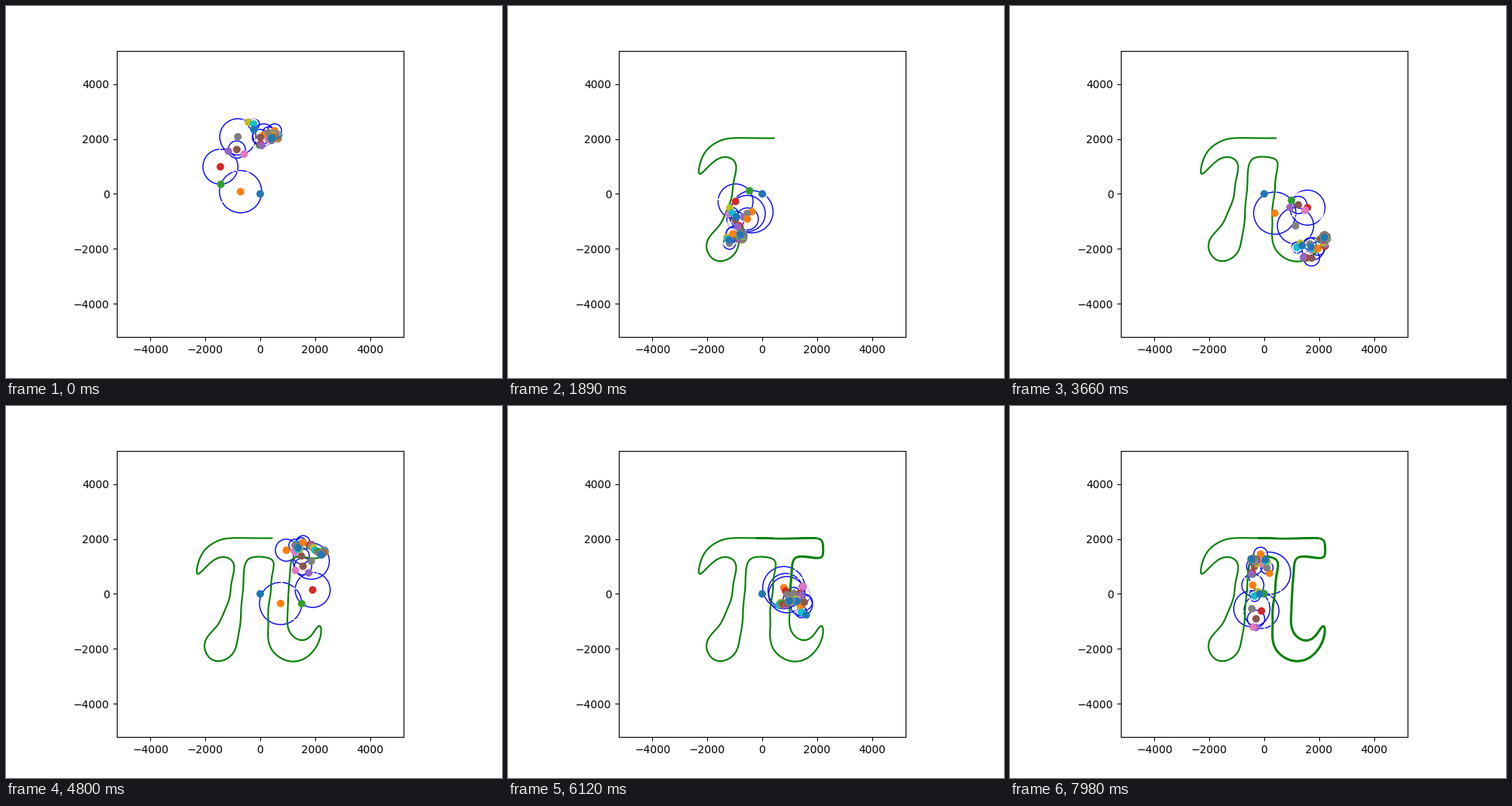
Write a matplotlib script that moves like this. It is 640 px wide and 480 px high and loops after 8 s.

```python
import matplotlib.pyplot as plt
import numpy as np
from matplotlib.animation import FuncAnimation
from matplotlib.collections import EllipseCollection

FRAMES = 267
LOOP_MS = 8000
PAIRS = 50            # harmonics +n and -n
START = 7             # phase of the first frame, one degree per frame
LIMIT = 5220
UNIT = 2 * LIMIT / 369.6   # data units per pixel
GAP = 25              # sideways shift of the return pass

# Strokes of the outline: phase at which each one ends, and its points in pixels.
STROKES = [
    (0, [(407, 170.6)]),
    (7, [(344, 170.5)]),
    (11.5, [(296, 170.3)]),
    (32, [(277, 172.8), (261, 180), (258, 186), (252, 192), (250, 202),
          (243, 215), (245, 218.7), (250, 218.5), (256, 209), (266, 200),
          (280, 195.6)]),
    (70, [(289, 195.6), (293.7, 199.5), (293, 215), (289, 243), (276, 278),
          (258, 302), (256, 310), (261, 324), (274, 329.3), (287, 325),
          (295, 315), (300.3, 295)]),
    (87, [(303, 270), (306.5, 225), (309, 201), (311, 196.5)]),
    (129, [(316, 195.5), (340, 195.5), (345.5, 199), (344.5, 210),
           (338, 283), (340, 308), (349, 322), (369, 329.4), (389, 324.5),
           (398, 314), (404.5, 299)]),
    (149, [(408, 288), (406, 282), (403, 281.8), (394, 298), (382, 301.8),
           (367, 294), (363, 277), (364, 252)]),
    (167, [(367.5, 204), (370, 195.6), (407, 195.7), (408.5, 192)]),
    (171.5, [(403, 180), (410.5, 171.8)]),
    (180, [(404, 170.5), (311, 170.5)]),
]


def slopes(v, knots):
    """Tangents that never overshoot: harmonic mean of the neighbours."""
    d = np.diff(v) / np.diff(knots)
    a, b = d[:-1], d[1:]
    mid = np.divide(2 * a * b, a + b, out=np.zeros_like(a), where=a * b > 0)
    return np.concatenate([d[:1], mid, d[-1:]])


def hermite(s, knots, p, m):
    """Smooth curve through p at knots with tangents m."""
    i = np.clip(np.searchsorted(knots, s, side="right") - 1, 0, len(p) - 2)
    h = knots[i + 1] - knots[i]
    u = (s - knots[i]) / h
    return ((1 + 2 * u) * (1 - u) ** 2 * p[i] + u * (1 - u) ** 2 * h * m[i]
            + u * u * (3 - 2 * u) * p[i + 1] + u * u * (u - 1) * h * m[i + 1])


def harmonics(samples=1440):
    """Fourier coefficients of the outline, traced there and back."""
    px = np.array([q for _, pts in STROKES for q in pts])
    p = ((px[:, 0] - 328) + 1j * (242.4 - px[:, 1])) * UNIT
    knots = np.concatenate([[0], np.cumsum(np.abs(np.diff(p)))])
    m = slopes(p.real, knots) + 1j * slopes(p.imag, knots)

    ends = np.cumsum([len(pts) for _, pts in STROKES]) - 1
    phase = np.arange(samples) * 360 / samples
    there = np.minimum(phase, 360 - phase)
    s = np.interp(there, [a for a, _ in STROKES], knots[ends])
    z = hermite(s, knots, p, m)

    ahead = hermite(np.minimum(s + 5, knots[-1]), knots, p, m)
    behind = hermite(np.maximum(s - 5, 0), knots, p, m)
    normal = 1j * (ahead - behind) / np.abs(ahead - behind)
    shift = GAP * np.clip(-8 * np.sin(np.radians(phase)), 0, 1)
    return np.fft.fft(z + shift * normal) / samples


coef = harmonics()
order = np.array([k for n in range(1, PAIRS + 1) for k in (n, -n)])
arms = coef[order]


def chain(frame):
    """Joints of the linked arms, from the centre to the pen."""
    turn = np.exp(1j * order * np.radians(START + frame))
    return np.concatenate([[0], coef[0] + np.cumsum(arms * turn)])


def xy(z):
    return np.column_stack([z.real, z.imag])


joints = [chain(f) for f in range(FRAMES)]
pen = np.array([j[-1] for j in joints])

fig, ax = plt.subplots(figsize=(6.4, 4.8), dpi=100)
ax.set_aspect("equal")
ax.set(xlim=(-LIMIT, LIMIT), ylim=(-LIMIT, LIMIT))
ax.set_xticks(range(-4000, 4001, 2000))
ax.set_yticks(range(-4000, 4001, 2000))

size = 2 * np.abs(arms)
circles = EllipseCollection(
    size, size, np.zeros(len(size)), units="xy",
    offsets=xy(joints[0][:-1]), offset_transform=ax.transData,
    facecolors="none", edgecolors=["white", "blue"] * PAIRS,
    linewidths=1, zorder=1)
ax.add_collection(circles, autolim=False)
trail, = ax.plot([], [], color="green", lw=1.5, zorder=2)
first = xy(joints[0])
dots = ax.scatter(first[:, 0], first[:, 1], s=36, linewidths=1, zorder=3,
                  c=[f"C{k % 10}" for k in range(len(first))])


def update(frame):
    circles.set_offsets(xy(joints[frame][:-1]))
    dots.set_offsets(xy(joints[frame]))
    path = pen[:frame + 1]
    trail.set_data(path.real, path.imag)
    return circles, trail, dots


def init():
    return update(0)


anim = FuncAnimation(fig, update, frames=FRAMES, init_func=init,
                     interval=LOOP_MS / FRAMES, repeat=True, repeat_delay=0)
plt.show()
```
